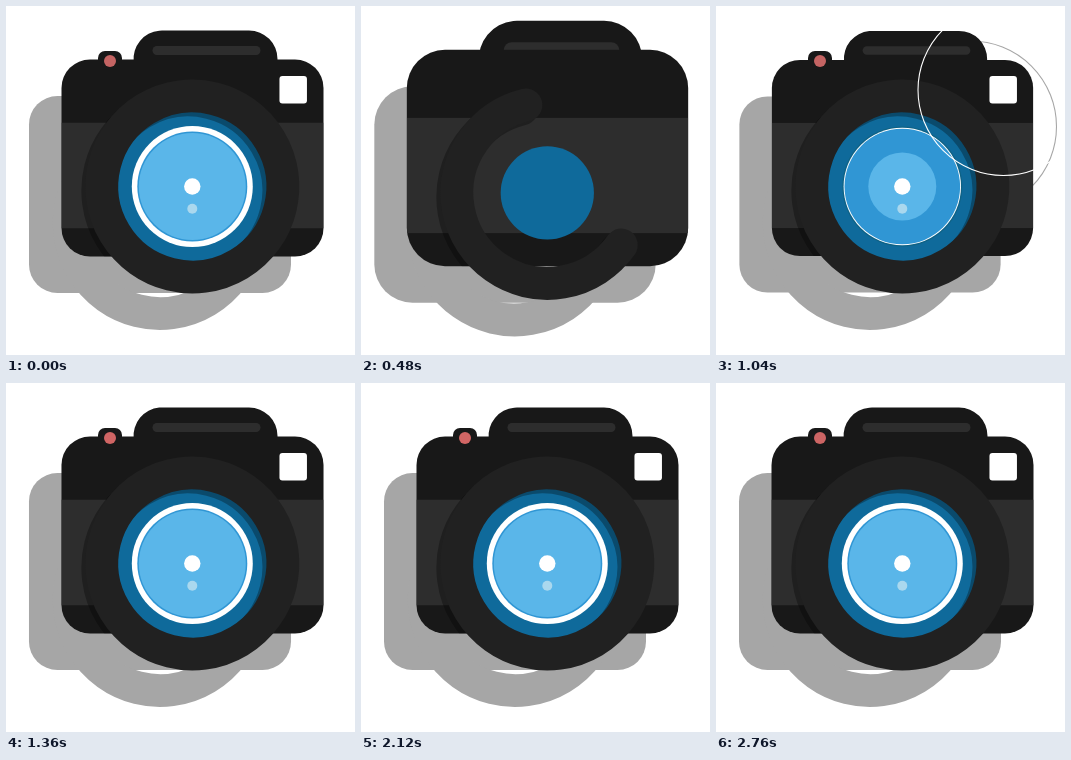
An HTML page with a canvas for the animation above (7760 ms loop, 349 by 349 pixels).

```html
<!DOCTYPE html>
<html lang="en">
<head>
<meta charset="utf-8">
<title>Camera</title>
<style>
  html, body { margin: 0; width: 100%; height: 100%; overflow: hidden; background: #fff; }
  canvas { display: block; }
</style>
</head>
<body>
<canvas id="stage" width="349" height="349"></canvas>
<script>
const ctx = document.getElementById('stage').getContext('2d');
const LOOP = 7760, STEP = 40, END = 2760;
const SHADE = '#a6a6a6', BODY = '#181818', PANEL = '#2d2d2d', LENS = '#212121';
const CX = 186.3;

const clamp = u => Math.max(0, Math.min(1, u));
const progress = (t, from, to) => clamp((t - from) / (to - from));
const linear = u => u;
const easeOut = u => 1 - (1 - u) ** 2;
const easeInOut = u => (1 - Math.cos(Math.PI * u)) / 2;

// Each key is [time, value, easing used to arrive there].
function track(t, keys) {
  if (t <= keys[0][0]) return keys[0][1];
  for (let i = 1; i < keys.length; i++) {
    const [t0, v0] = keys[i - 1], [t1, v1, ease = linear] = keys[i];
    if (t < t1) return v0 + (v1 - v0) * ease(progress(t, t0, t1));
  }
  return keys[keys.length - 1][1];
}

function disc(x, y, r, color) {
  if (r <= 0) return;
  ctx.fillStyle = color;
  ctx.beginPath();
  ctx.arc(x, y, r, 0, 2 * Math.PI);
  ctx.fill();
}

function box(x, y, w, h, r, color) {
  ctx.beginPath();
  ctx.roundRect(x, y, w, h, r);
  if (color) {
    ctx.fillStyle = color;
    ctx.fill();
  }
}

function line(x1, y1, x2, y2, width, color) {
  ctx.strokeStyle = color;
  ctx.lineWidth = width;
  ctx.lineCap = 'round';
  ctx.beginPath();
  ctx.moveTo(x1, y1);
  ctx.lineTo(x2, y2);
  ctx.stroke();
}

// Case and hump are sharp shapes inflated by a springy round outline.
function swell(t) {
  const s = Math.max(0, t - 280);
  return 28.5 * (1 - Math.exp(-0.0054 * s) * Math.cos(2 * Math.PI * s / 400));
}

function caseOutline(t, color) {
  const k = swell(t), w = 205 * easeOut(progress(t, 40, 240));
  if (w) box(84 - k, 82 - k, w + 2 * k, 140 + 2 * k, k, color);
  return w > 0;
}

function hump(t, color) {
  const rise = easeOut(progress(t, 140, 260)), k = swell(t);
  if (!rise) return;
  const top = 84 - 31 * rise;
  ctx.beginPath();
  ctx.moveTo(156, top);
  ctx.lineTo(243, top);
  ctx.lineTo(241, 84);
  ctx.lineTo(159, 84);
  ctx.closePath();
  ctx.fillStyle = ctx.strokeStyle = color;
  ctx.fill();
  if (k > 0) {
    ctx.lineJoin = 'round';
    ctx.lineWidth = 2 * k;
    ctx.stroke();
  }
}

function button(t, color) {
  const q = track(t, [[480, 0], [680, .8, easeOut], [800, 1]]);
  if (q) box(104 - 12 * q, 57 - 12 * q, 24 * q, 24, 7 * q, color);
}

const lensY = t => track(t, [
  [40, -110], [280, 88], [440, 187.5, easeOut], [680, 179, easeInOut], [840, 180.5, easeInOut]
]);

function lensRing(t, color) {
  const start = track(t, [[40, 205], [280, 115.4], [680, -45], [780, -76]]);
  const end = track(t, [[40, 206], [280, 231.6], [680, 281], [780, 284]]);
  ctx.strokeStyle = color;
  ctx.lineWidth = 33;
  ctx.lineCap = 'round';
  ctx.beginPath();
  ctx.arc(CX, lensY(t), 90.5, start * Math.PI / 180, end * Math.PI / 180);
  ctx.stroke();
}

function flashRing(t, color) {
  const u = progress(t, 560, 1080);
  if (u <= 0 || u >= 1) return;
  ctx.strokeStyle = color;
  ctx.lineWidth = 14 * (1 - u);
  ctx.beginPath();
  ctx.arc(287.5, 84, 86 * easeOut(u), 0, 2 * Math.PI);
  ctx.stroke();
}

function flashRay(t) {
  const u = progress(t, 600, 760);
  if (u <= 0 || u >= 1) return;
  const d = 82 + 30 * u, half = 7 * Math.sin(Math.PI * u);
  const at = s => [287.5 + s * .73, 84 - s * .68];
  line(...at(d - half), ...at(d + half), 6, SHADE);
}

function castShadow(t) {
  ctx.save();
  ctx.translate(-32.5, 36.5);
  caseOutline(t, SHADE);
  hump(t, SHADE);
  lensRing(t, SHADE);
  flashRing(t, SHADE);
  flashRay(t);
  ctx.restore();
}

function casing(t) {
  const k = swell(t);
  button(t, BODY);
  hump(t, BODY);
  if (k > 2) line(151, 44.5, 250, 44.5, Math.max(0, 9 + (k - 28.5) * .8), PANEL);
  if (!caseOutline(t, BODY)) return;
  ctx.save();
  ctx.clip();
  const wipe = progress(t, 160, 315);
  if (wipe) {
    ctx.fillStyle = PANEL;
    ctx.fillRect(84 - k, 131 - k / 2, 205 * wipe + 2 * k, 77 + k);
  }
  ctx.restore();
}

function ringShade(t) {
  ctx.save();
  if (caseOutline(t)) {
    ctx.clip();
    ctx.translate(-4, 4);
    lensRing(t, 'rgba(0,0,0,.3)');
  }
  ctx.restore();
}

function glass(t) {
  const y = lensY(t);
  disc(CX, y, track(t, [[500, 0], [680, 63, easeOut], [840, 60]]), '#0f6285');
  disc(CX, y, track(t, [[560, 0], [680, 42], [1040, 58.7, easeOut], [1240, 60.5]]), '#fff');
  disc(CX, y, track(t, [[640, 0], [680, 8.8], [1040, 57.8, easeInOut], [1240, 55]]), '#3096d4');
  disc(CX, y, track(t, [[880, 0], [1040, 34], [1240, 53.5, easeOut]]), '#5ab6e9');
  disc(CX, y, track(t, [[600, 0], [680, 8.2]]), '#fff');
  disc(CX, y + 22.3, track(t, [[600, 0], [680, 5]]), '#aad8ee');
}

function finder(t) {
  const size = track(t, [[520, 0], [680, 28], [760, 30], [840, 27.5]]);
  if (!size) return;
  box(287.2 - size / 2, 83.8 - size / 2, size, size, 3, '#fff');
  if (t < 780) {
    ctx.strokeStyle = '#fff';
    ctx.lineWidth = 4;
    ctx.lineCap = 'round';
    ctx.setLineDash([0, 4]);
    ctx.stroke();
    ctx.setLineDash([]);
  }
}

function lamp(t, first) {
  const glow = first ? 0 : (1 + Math.cos(2 * Math.PI * (t - 1760) / 1440)) / 2;
  const color = `rgb(${196 + 28 * glow},${100 + 3 * glow},${99 + 3 * glow})`;
  disc(104, 55, 6 * progress(t, 700, 820), color);
}

function draw(now) {
  const stepTime = Math.floor(now % LOOP / STEP) * STEP;
  const first = stepTime === 0;
  const t = first ? END : Math.min(stepTime, END);
  ctx.fillStyle = '#fff';
  ctx.fillRect(0, 0, 349, 349);
  castShadow(t);
  casing(t);
  disc(CX, lensY(t), track(t, [[420, 0], [640, 99, easeOut]]), '#0f6a9b');
  ringShade(t);
  lensRing(t, LENS);
  glass(t);
  flashRing(t, '#fff');
  finder(t);
  lamp(t, first);
}

const origin = performance.now();
function tick() {
  draw(performance.now() - origin);
  requestAnimationFrame(tick);
}
tick();
</script>
</body>
</html>
```
